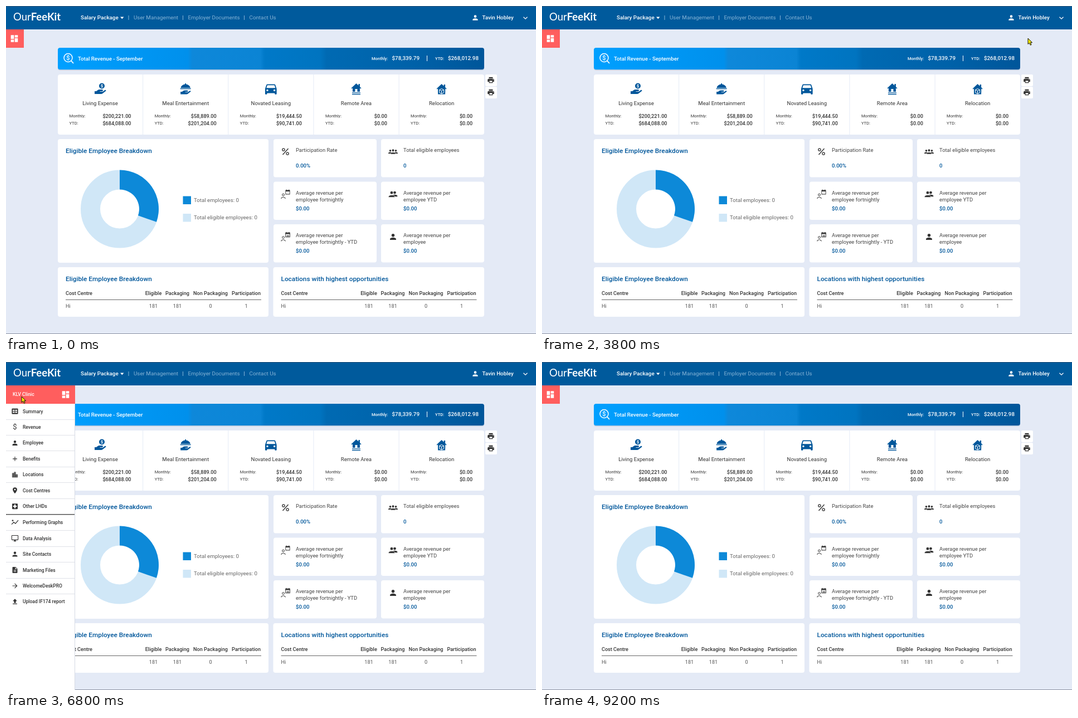
An HTML page for the animation above (9600 ms loop, 951 px wide and 589 px high).

```html
<!DOCTYPE html>
<html lang="en">
<head>
<meta charset="utf-8">
<title>Salary dashboard</title>
<style>
  html, body { margin: 0; width: 100%; height: 100%; overflow: hidden; background: #e4eaf6; }
  svg { display: block; width: 951px; height: 589px; font-family: Roboto, Arial, sans-serif; }
</style>
</head>
<body>
<svg id="stage" viewBox="0 0 951 589" xmlns="http://www.w3.org/2000/svg"></svg>
<script>
const LOOP = 9600, BLUE = '#00579b', INK = '#333', GREY = '#555', RED = '#ff5e5e';

// Filled icons on a 24 unit grid
const ICONS = {
  tiles: 'M3 13h8V3H3zm0 8h8v-6H3zm10 0h8V11h-8zm0-18v6h8V3z',
  person: 'M12 12a4 4 0 1 0 0-8 4 4 0 0 0 0 8zm0 2c-2.7 0-8 1.3-8 4v2h16v-2c0-2.7-5.3-4-8-4z',
  print: 'M19 8H5a3 3 0 0 0-3 3v6h4v4h12v-4h4v-6a3 3 0 0 0-3-3zm-3 11H8v-5h8zm3-7a1 1 0 1 1 0-2 1 1 0 0 1 0 2zM18 3H6v4h12z',
  pencil: 'M3 17.2V21h3.8L17.8 9.9l-3.7-3.7zM20.7 7q.7-.7 0-1.4l-2.3-2.3q-.7-.7-1.4 0l-1.9 1.8 3.8 3.8z',
  lock: 'M18 8h-1V6A5 5 0 0 0 7 6v2H6a2 2 0 0 0-2 2v10a2 2 0 0 0 2 2h12a2 2 0 0 0 2-2V10a2 2 0 0 0-2-2zm-6 9a2 2 0 1 1 0-4 2 2 0 0 1 0 4zm3-9H9V6a3 3 0 0 1 6 0z',
  shield: 'M12 1L3 5v6c0 5.6 3.8 10.7 9 12 5.2-1.3 9-6.4 9-12V5zm0 11h7c-.5 4.1-3.3 7.8-7 8.9V12H5V6.3l7-3.1z',
  table: 'M4 3h16q2 0 2 2v14q0 2-2 2H4q-2 0-2-2V5q0-2 2-2zM5 7v4h6V7zm8 0v4h6V7zm-8 6v4h6v-4zm8 0v4h6v-4z',
  plus: 'M19 13h-6v6h-2v-6H5v-2h6V5h2v6h6z',
  city: 'M15 11V5l-3-3-3 3v2H3v14h18V11zm-8 8H5v-2h2zm0-4H5v-2h2zm0-4H5V9h2zm6 8h-2v-2h2zm0-4h-2v-2h2zm0-4h-2V9h2zm0-4h-2V5h2zm6 12h-2v-2h2zm0-4h-2v-2h2z',
  pin: 'M12 2a7 7 0 0 0-7 7c0 5.2 7 13 7 13s7-7.8 7-13a7 7 0 0 0-7-7zm0 9.5a2.5 2.5 0 1 1 0-5 2.5 2.5 0 0 1 0 5z',
  cross: 'M19 3H5q-2 0-2 2v14q0 2 2 2h14q2 0 2-2V5q0-2-2-2zm-1 11h-4v4h-4v-4H6v-4h4V6h4v4h4z',
  screen: 'M21 2H3q-2 0-2 2v12q0 2 2 2h7v2H8v2h8v-2h-2v-2h7q2 0 2-2V4q0-2-2-2zm0 14H3V4h18z',
  file: 'M14 2H6q-2 0-2 2v16q0 2 2 2h12q2 0 2-2V8zm2 16H8v-2h8zm0-4H8v-2h8zm-3-5V3.5L18.5 9z',
  arrow: 'M12 4l-1.4 1.4 5.6 5.6H4v2h12.2l-5.6 5.6L12 20l8-8z',
  upload: 'M9 16h6v-6h4l-7-7-7 7h4zm-4 2h14v2H5z',
  car: 'M18.9 6q-.4-1-1.4-1h-11Q5.500 5 5.100 6L3 12v8q0 1 1 1h1q1 0 1-1v-1h12v1q0 1 1 1h1q1 0 1-1v-8zM6.500 16a1.500 1.500 0 1 1 0-3 1.500 1.500 0 0 1 0 3zm11 0a1.500 1.500 0 1 1 0-3 1.500 1.500 0 0 1 0 3zM5 11l1.500-4.500h11L19 11z',
  swap: 'M4 3h16q1 0 1 1v16q0 1-1 1H4q-1 0-1-1V4q0-1 1-1zM14 5v2H6v2h8v2l4-3zM10 13l-4 3 4 3v-2h8v-2h-8z',
  calendar: 'M3 4h3V2h2v2h8V2h2v2h3v18H3zM5 10v10h14V10z'
};

// Outline icons centred on 0,0
const LINES = {
  home: 'M-6-1L0-6.500 6-1M-4.800-2V6H-1.500V1.500h3V6H4.800V-2',
  box: 'M0-6.300L5.700-3.200V3.200L0 6.300-5.700 3.200V-3.200ZM-5.700-3.200L0 0 5.700-3.200M0 0V6.300M-3-4.700L3-1.600',
  hourglass: 'M-4-6.300H4M-4 6.300H4M-3-6V-3L0 0 3-3V-6M-3 6V3L0 0 3 3V6M-1.500-3.200h3M-1.500 4.500h3',
  updown: 'M-3 5.500V-5M-5.200-2.800L-3-5.200-.8-2.800M3-5.500V5M.8 2.800L3 5.200 5.200 2.800',
  trend: 'M-6 3.500L-2-.5 1 2 6-4M-5.500-3.500h3M-4-5v3',
  chevron: 'M-3.500-1.700L0 1.700 3.500-1.700',
  percent: 'M-5 5.500L5-5.500'
};
const HAND = 'M-10 4h3l3-2.300q1-.7 2-.7h6q2 1.500 0 3h-4.500v.8h5.200l3.600-2.800q2-.6 2.200 1.200l-6 4.900q-1 .8-2.300.8H-10z';

const rect = (x, y, w, h, fill, r = 0, extra = '') =>
  `<rect x="${x}" y="${y}" width="${w}" height="${h}" rx="${r}" fill="${fill}" ${extra}/>`;
const text = (x, y, s, size, fill, weight = 400, anchor = 'start') =>
  `<text x="${x}" y="${y}" font-size="${size}" fill="${fill}" font-weight="${weight}" text-anchor="${anchor}">${s}</text>`;
const icon = (name, x, y, k, fill) =>
  `<path transform="translate(${x} ${y}) scale(${k}) translate(-12 -12)" fill="${fill}" fill-rule="evenodd" d="${ICONS[name]}"/>`;
const outline = (name, x, y, color, width = 1.1) =>
  `<path transform="translate(${x} ${y})" fill="none" stroke="${color}" stroke-width="${width}" d="${LINES[name]}"/>`;
const circle = (x, y, r, fill, extra = '') => `<circle cx="${x}" cy="${y}" r="${r}" fill="${fill}" ${extra}/>`;
const at = (x, y, s) => `<g transform="translate(${x} ${y})">${s}</g>`;
const group = (id, s) => `<g id="${id}">${s}</g>`;
const card = (x, y, w, h) => rect(x, y, w, h, '#fff', 4);

function banner() {
  const stops = [[0, '#00a0ff'], [.305, '#0090ec'], [.315, '#0e88da'], [.475, '#0b84d4'],
    [.485, '#0079c8'], [.615, '#0074c0'], [.63, '#006ab3'], [.84, '#0061a8'], [1, '#00569a']];
  return `<defs><linearGradient id="band">${stops.map(([o, c]) => `<stop offset="${o}" stop-color="${c}"/>`).join('')}</linearGradient></defs>`
    + rect(93, 76, 765, 39.500, '#b9c9de', 4) + rect(93, 75, 765, 39, 'url(#band)', 4)
    + circle(111.500, 93, 7.500, 'none', 'stroke="#fff" stroke-width="1.500"')
    + '<path d="M117 98.500l4 4.500" stroke="#fff" stroke-width="1.800"/>'
    + text(111.500, 97, '$', 11, '#fff', 500, 'middle')
    + text(129, 97.500, 'Total Revenue - September', 9.700, '#fff', 500)
    + text(656, 97, 'Monthly:', 7.500, '#fff', 500) + text(742, 97, '$78,339.79', 9.800, '#fff', 500, 'end')
    + rect(755, 89, 1, 10, '#fff')
    + text(770, 97, 'YTD:', 7.500, '#fff', 500) + text(848, 97, '$268,012.98', 9.800, '#fff', 500, 'end');
}

const house = `<path fill="${BLUE}" d="M-9-1.500L0-10 4-6.300V-9H6.500V-4L9-1.500 8-.5 6.500-1.800V5H2V0H-2V5H-6.500V-1.800L-8-.5Z"/>`;
const benefitIcons = [
  `<path fill="${BLUE}" d="${HAND}"/>` + circle(3, -5.500, 5, BLUE) + text(3, -2.600, '$', 8, '#fff', 700, 'middle'),
  `<path fill="${BLUE}" d="M-8.500-2a8.500 6.800 0 0 1 7.500-6.500v-1.500h2v1.500a8.500 6.800 0 0 1 7.500 6.500zM-9.500-1.200h19v1.500h-19z"/>`
    + `<path transform="translate(0 1.500) scale(.9)" fill="${BLUE}" d="${HAND}"/>`,
  icon('car', 0, -.5, 1.150, BLUE),
  house + rect(-7.500, 6.300, 15, 1.300, BLUE) + rect(-7.500, 9, 15, 1.300, BLUE),
  `<g transform="translate(0 1)">${house}</g>` + rect(-6.500, 0, 13, 9.500, BLUE) + at(0, 3.500,
    '<path fill="none" stroke="#fff" d="M0-4L4-2V3L0 5-4 3V-2ZM-4-2L0 0 4-2M0 0V5"/>')
];

function benefits() {
  const rows = [['Living Expense', '$200,221.00', '$684,088.00'], ['Meal Entertainment', '$58,889.00', '$201,204.00'],
    ['Novated Leasing', '$19,444.50', '$90,741.00'], ['Remote Area', '$0.00', '$0.00'], ['Relocation', '$0.00', '$0.00']];
  return card(93, 123, 765, 108) + rows.map(([name, month, ytd], i) => at(169 + 153.150 * i, 0,
    at(0, 149, benefitIcons[i]) + (i ? rect(-77, 123, 1, 108, '#e4eaf6') : '')
    + text(0, 177.500, name, 9.600, INK, 400, 'middle')
    + text(-55.500, 200, 'Monthly:', 7.600, INK) + text(55.500, 201, month, 9.100, INK, 500, 'end')
    + text(-55.500, 212.500, 'YTD:', 7.600, INK) + text(55.500, 213.500, ytd, 9.100, INK, 500, 'end'))).join('')
    + [133, 155].map(y => rect(860, y - 10, 21, 21, '#fff', 2) + icon('print', 870, y, .58, INK)).join('');
}

function donut() {
  const a = 109.500 * Math.PI / 180, cx = 204, cy = 364.500;
  const p = r => `${cx + r * Math.sin(a)} ${cy - r * Math.cos(a)}`;
  const legend = (y, color, s) => rect(317.500, y, 14.500, 14.500, color) + text(337, y + 10, s, 9.700, '#666');
  return card(93, 239, 378, 222) + text(107, 264, 'Eligible Employee Breakdown', 11.800, BLUE, 500)
    + circle(cx, cy, 52.500, 'none', 'stroke="#d0e7f7" stroke-width="35"')
    + `<path fill="#0d89d8" d="M${cx} ${cy - 70}A70 70 0 0 1 ${p(70)}L${p(35)}A35 35 0 0 0 ${cx} ${cy - 35}Z"/>`
    + legend(341.500, '#0d89d8', 'Total employees: 0') + legend(373, '#d0e7f7', 'Total eligible employees: 0');
}

const worker = at(-4, 3, circle(0, -2, 1.900, 'none', `stroke="${INK}"`)
  + `<path fill="none" stroke="${INK}" d="M-3.500 5V3.500Q0 .5 3.500 3.500V5"/>`);
const statIcons = [
  outline('percent', 0, 0, INK, 1.400) + circle(-3.500, -3.500, 2.200, 'none', `stroke="${INK}" stroke-width="1.300"`)
    + circle(3.500, 3.500, 2.200, 'none', `stroke="${INK}" stroke-width="1.300"`),
  icon('person', -5, 0, .45, INK) + icon('person', 5, 0, .45, INK)
    + `<g stroke="#fff" stroke-width="1">${icon('person', 0, 0, .57, INK)}</g>`,
  worker + icon('calendar', 4, -4, .45, INK),
  icon('person', 3, -.5, .6, INK) + `<g stroke="#fff" stroke-width="1">${icon('person', -2.500, 0, .7, INK)}</g>`,
  worker + icon('calendar', 4, -4, .48, INK) + rect(2, -3, 4.500, 1, INK) + rect(2, -1, 4.500, 1, INK),
  icon('person', 0, 0, .68, INK)
];

function stats() {
  const items = [['Participation Rate', '', '0.00%'], ['Total eligible employees', '', '0'],
    ['Average revenue per', 'employee fortnightly', '$0.00'], ['Average revenue per', 'employee YTD', '$0.00'],
    ['Average revenue per', 'employee fortnightly - YTD', '$0.00'], ['Average revenue per', 'employee', '$0.00']];
  return items.map(([a, b, value], i) => {
    const row = i >> 1, y = 239 + 76.500 * row;
    return at(480 + 193 * (i % 2), 0, card(0, y, 185, 68.500) + at(21.500, y + 22.500, statIcons[i])
      + text(40, y + 23.300, a, 9.400, '#444') + text(40, y + 35.300, b, 9.400, '#444')
      + text(40, y + (row ? 51.300 : 51), value, 9.600, BLUE, 500));
  }).join('');
}

function table(x, w, title) {
  const cols = [['Eligible', 171.500, 181], ['Packaging', 214.500, 181], ['Non Packaging', 274, 0], ['Participation', 338, 1]];
  return at(x, 0, card(0, 469, w, 89) + text(14, 494, title, 11.800, BLUE, 500)
    + text(14, 519, 'Cost Centre', 9.100, INK, 500) + text(14, 542, 'Hi', 9.100, GREY) + rect(14, 527, 351, 1, '#666')
    + cols.map(([head, cx, v]) => text(cx, 519, head, 9.100, INK, 500, 'middle') + text(cx, 542, v, 9.100, GREY, 400, 'middle')).join(''));
}

function sidebar() {
  const rows = [['table', 'Summary'], ['$', 'Revenue'], ['person', 'Employee'], ['plus', 'Benefits'], ['city', 'Locations'],
    ['pin', 'Cost Centres'], ['cross', 'Other LHDs'], ['trend', 'Performing Graphs'], ['screen', 'Data Analysis'],
    ['person', 'Site Contacts'], ['file', 'Marketing Files'], ['arrow', 'WelcomeDeskPRO'], ['upload', 'Upload IF174 report']];
  const mark = (n, y) => n === '$' ? text(16, y + 4.500, '$', 13, INK, 400, 'middle')
    : n === 'trend' ? outline(n, 16, y, INK, 1.300) : icon(n, 16, y, .56, INK);
  const list = rect(0, 75, 123, 514, '#fff') + rect(123, 75, 1, 514, '#d5dae4') + rows.map(([n, s], i) => {
    const y = 88.500 + 28.450 * i + (i > 6 ? .5 : 0);
    return mark(n, y) + text(30, y + 3, s, 8.500, INK, 500)
      + (i < 12 ? rect(0, Math.round(y + 14), 123, i === 6 ? 1.500 : 1, i === 6 ? '#555' : '#e0e2e8') : '');
  }).join('');
  return group('list', list) + group('tile', rect(0, 42, 124, 33, RED)
    + text(12, 61.300, 'KLV Clinic', 8.700, '#fff', 500) + icon('tiles', 107, 58.500, .7, '#fff'));
}

function menu() {
  const items = [['home', 250, 'Home'], ['box', 333, 'Employee packages'], ['swap', 431, 'Held balance'],
    ['hourglass', 513.700, 'Transactions'], ['box', 598.300, 'GST reporting'], ['updown', 684.300, 'FBT reporting']];
  return rect(0, 104, 951, 2, '#c3cad6') + rect(0, 42, 951, 63, '#fff') + items.map(([n, x, s], i) => {
    const color = i ? '#444' : '#0061a8';
    const body = (n === 'swap' ? icon(n, 0, -10, .6, color) : outline(n, 0, -10, color)) + text(0, 13, s, 9.700, color, 500, 'middle');
    return at(x, 74, i === 1 ? group('packages', body) : body);
  }).join('');
}

function header() {
  const pale = '#86b3d6';
  return rect(0, 0, 951, 42, '#005a9c')
    + `<text x="13" y="26" font-family="Lato, sans-serif" font-size="18.500" fill="#fff">Our<tspan font-weight="700">FeeKit</tspan></text>`
    + text(134, 24.300, 'Salary Package', 9.800, '#fff', 500) + '<path d="M205 19.500h6.500l-3.250 3.800z" fill="#fff"/>'
    + text(229, 24.300, 'User Management', 9.800, pale) + text(326.500, 24.300, 'Employer Documents', 9.800, pale)
    + text(436.500, 24.300, 'Contact Us', 9.800, pale)
    + [219.500, 317, 427].map(x => rect(x, 17, 1, 8, pale)).join('')
    + group('hot', rect(821, 0, 130, 42, '#0072c6'))
    + icon('person', 842, 21, .58, '#fff') + text(854.500, 24.300, 'Tavin Hobley', 9.800, '#fff', 500)
    + outline('chevron', 932, 21.500, '#fff', 1.200) + rect(0, 0, 951, 1, '#34587a');
}

function dropdown() {
  const items = [['pencil', 'Personal details'], ['lock', 'Change password'], ['shield', 'Additional security'], ['', 'Log out']];
  return group('drop', rect(820, 42, 131, 153, '#d3dae6') + rect(821, 42, 130, 152, '#fff') + items.map(([n, s], i) => {
    const y = 60.500 + 38.100 * i;
    return (n ? icon(n, 842, y + .5, .52, BLUE) : '') + text(n ? 854.500 : 870, y + 3.500, s, 9.700, BLUE, 500)
      + (i < 3 ? rect(821, Math.round(y + 19), 130, 1, '#e4e8f0') : '');
  }).join(''));
}

const pointers = group('cursor', `<g fill="#ffee00" stroke="#111" stroke-width="1" stroke-linejoin="round">
  <path id="tip" d="M0 0V10.500L2.500 8.300 4.300 12.300 6.100 11.500 4.400 7.700H7.600Z"/>
  <path id="palm" d="M-1.800 1.200Q-.5-.8.800 1.200V5L4.200 6Q5 6.400 5 7.500V10L3.700 13.500H-2.500L-4.800 9.300Q-5 7.300-3.300 7.800L-1.800 9Z"/></g>`);

const $ = id => document.getElementById(id);
$('stage').innerHTML = rect(0, 0, 951, 589, '#e4eaf6') + banner() + benefits() + donut() + stats()
  + table(93, 378, 'Eligible Employee Breakdown') + table(479.500, 378.500, 'Locations with highest opportunities')
  + rect(0, 588, 951, 1, '#8d93a3') + sidebar() + group('menu', menu()) + header() + dropdown() + pointers;

// Pointer stops: time, x, y
const PATH = [[1200, 168, -18], [1300, 160, 8], [1600, 147, 5], [1800, 152, 10], [2100, 164, 16], [2200, 164, 16],
  [2300, 170, 21], [2600, 170, 21], [2700, 168, 24], [2800, 168, 24], [3000, 255, 48], [3200, 362, 84], [3300, 412, 99],
  [3500, 570, 150], [3700, 790, 110], [3800, 872, 58], [3900, 902, 34], [4000, 910, 26], [4100, 910, 26], [4200, 909, 30],
  [4700, 909, 30], [4800, 898, 32], [5000, 770, 70], [5300, 450, 105], [5500, 240, 85], [5700, 116, 65], [5800, 84, 65],
  [5900, 84, 65], [6100, 40, 63], [6300, 28, 62], [8000, 28, 62], [8200, 50, 64], [8500, 115, 56], [8600, 115, 56],
  [8700, 141, 44], [8800, 175, 14], [8900, 205, -20]];

function pointerAt(t) {
  const i = PATH.findIndex(p => p[0] > t);
  if (i < 1) return [0, -50];
  const [a, b] = [PATH[i - 1], PATH[i]], k = (t - a[0]) / (b[0] - a[0]);
  return [a[1] + (b[1] - a[1]) * k, a[2] + (b[2] - a[2]) * k];
}

const ramp = (t, a, b) => { const k = Math.min(1, Math.max(0, (t - a) / (b - a))); return k * k * (3 - 2 * k); };
const between = (t, a, b) => t >= a && t < b;
const set = (id, name, value) => $(id).setAttribute(name, value);

function draw(t) {
  const open = ramp(t, 1200, 1550) - ramp(t, 3450, 3750);
  set('menu', 'transform', `translate(0 ${-65 * (1 - open)})`);
  const hover = ramp(t, 3000, 3150) - ramp(t, 3300, 3450);
  set('packages', 'transform', `scale(${1 + .06 * hover})`);
  for (const el of $('packages').children)
    el.setAttribute(el.tagName === 'text' ? 'fill' : 'stroke', hover > .3 ? '#1668a8' : '#444');

  const user = ramp(t, 3800, 4000) - ramp(t, 4850, 5050);
  set('hot', 'opacity', user);
  set('drop', 'opacity', user);

  const shut = 1 - ramp(t, 6200, 6700) + ramp(t, 8670, 9170);
  set('tile', 'transform', `translate(${-92 * shut} 0)`);
  set('list', 'transform', `translate(${-124 * shut} 0)`);

  const palm = t < 2900 || between(t, 3000, 3250) || between(t, 3900, 4950);
  set('cursor', 'transform', `translate(${pointerAt(t)})`);
  set('palm', 'opacity', palm ? 1 : 0);
  set('tip', 'opacity', palm ? 0 : 1);
}

function tick() {
  draw(Math.floor(performance.now() % LOOP / 100) * 100);
  requestAnimationFrame(tick);
}
tick();
</script>
</body>
</html>
```
